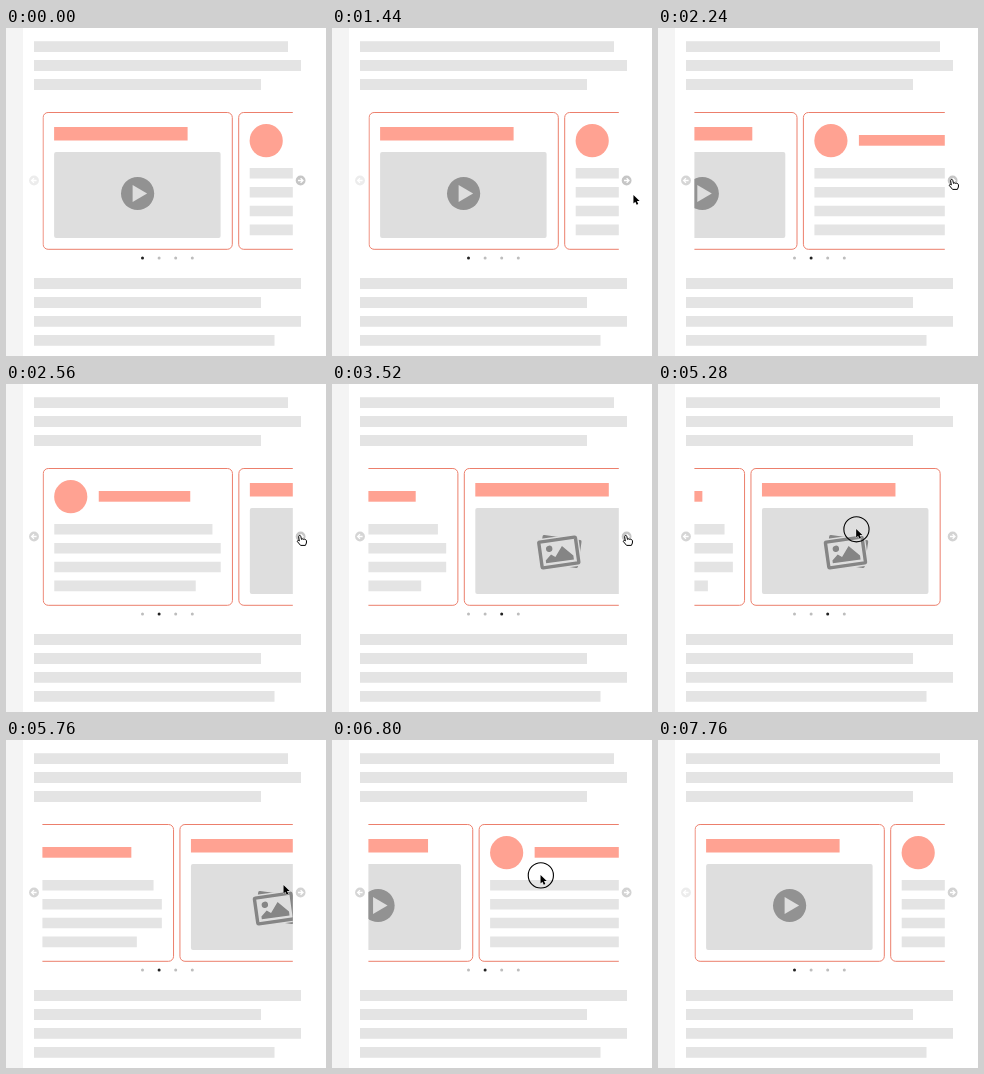
Animation of 320 by 328 pixels, one loop 9120 ms. Source, as an HTML page:

```html
<!DOCTYPE html>
<html lang="en">
<head>
<meta charset="utf-8">
<title>Carousel</title>
<style>
  html, body { margin: 0; width: 100%; height: 100%; overflow: hidden; background: #fff; }
  svg { display: block; width: 100%; height: 100%; }
</style>
</head>
<body>
<svg viewBox="0 0 320 328">
  <defs>
    <clipPath id="view"><rect x="36.4" y="80" width="250.4" height="146"/></clipPath>
    <g id="frame">
      <rect x=".5" y="84.5" width="189.2" height="136.8" rx="5" fill="#fff" stroke="#ec7f6c"/>
    </g>
    <g id="media">
      <use href="#frame"/>
      <rect x="11.5" y="99" width="133.5" height="13.5" fill="#ffa292"/>
      <rect x="11.5" y="124" width="166.5" height="86" rx="2" fill="#dedede"/>
    </g>
    <g id="video">
      <use href="#media"/>
      <circle cx="95" cy="165.5" r="16.6" fill="#929292"/>
      <path d="M90 157V174L104.5 165.5Z" fill="#dedede"/>
    </g>
    <g id="photo">
      <use href="#media"/>
      <g fill="#dedede" stroke="#858585" stroke-width="3.4" stroke-linejoin="round">
        <rect x="-18" y="-12.5" width="36" height="25" transform="translate(96.5 167.5) rotate(8)"/>
        <g transform="translate(95 168.5) rotate(-8)">
          <rect x="-21.5" y="-16" width="43" height="32" rx="2" stroke="none"/>
          <rect x="-18.5" y="-13" width="37" height="26" rx="1"/>
          <g fill="#858585" stroke="none">
            <circle cx="-9" cy="-5" r="3.2"/>
            <path d="M-14 9V6L-8 1L-4 4L4 -6L14 5V9Z"/>
          </g>
        </g>
      </g>
    </g>
    <g id="profile">
      <use href="#frame"/>
      <circle cx="28" cy="112.7" r="16.6" fill="#ffa292"/>
      <rect x="56" y="107" width="91.5" height="10.7" fill="#ffa292"/>
      <path d="M11.5 145.3H169.7M11.5 164.2H178M11.5 183H178M11.5 201.9H153" stroke="#e4e4e4" stroke-width="10.6"/>
    </g>
    <g id="nav">
      <circle r="4.9"/>
      <path d="M-2.6 0H2M0 -2.4L2.4 0L0 2.4" fill="none" stroke="#fff" stroke-width="1.3"/>
    </g>
  </defs>

  <rect width="320" height="328" fill="#fff"/>
  <rect width="17" height="328" fill="#f4f4f4"/>
  <path d="M28 18.7H282M28 37.5H295M28 56.5H255M28 255.5H295M28 274.5H255M28 293.4H295M28 312.4H268.5" stroke="#e4e4e4" stroke-width="10.8"/>

  <g clip-path="url(#view)">
    <g id="track">
      <use href="#video"/>
      <use href="#profile" x="195.6"/>
      <use href="#photo" x="391.2"/>
      <use href="#profile" x="586.8"/>
    </g>
  </g>

  <g id="dots">
    <circle cx="136.5" cy="230" r="1.5"/>
    <circle cx="153.1" cy="230" r="1.5"/>
    <circle cx="169.7" cy="230" r="1.5"/>
    <circle cx="186.3" cy="230" r="1.5"/>
  </g>
  <use id="prev" href="#nav" transform="translate(28 152.5) scale(-1 1)"/>
  <use id="next" href="#nav" transform="translate(294.6 152.5)"/>

  <circle id="ring" r="12.6" fill="none" stroke="#000" stroke-width="1.1"/>
  <path id="arrow" d="M0 0V8.4L1.9 6.7L3.2 9.6L4.8 8.9L3.5 6H6.2Z" fill="#000" stroke="#fff" stroke-width=".7" paint-order="stroke"/>
  <path id="hand" d="M-1.2 .4C-1.2 -1 .8 -1 1 .2L1.7 3.2C2.6 2.4 3.4 2.8 3.6 3.2C4.4 2.6 5 3 5.2 3.6C6 3.2 6.6 3.8 6.7 4.5L6.6 6.8L5.6 9.2H.8L-2.4 5.4C-2.8 4.4 -1.4 3.8 -.5 4.8Z" fill="#fff" stroke="#000" stroke-width="1" stroke-linejoin="round"/>
</svg>

<script>
const LOOP = 9120, STEP = 80, PITCH = 195.6, SETTLE = 460;
const CLICKS = [2080, 3360];
const DRAGS = [
  { press: 4800, release: 5740, from: 142.3, to: 277.5, index: 2 },
  { press: 6540, release: 6858, from: 98.5, to: 219.5, index: 1 }
];
const $ = id => document.getElementById(id);
const dots = [...$('dots').children];

const linear = p => p;
const sine = p => (1 - Math.cos(Math.PI * p)) / 2;
const out = p => 1 - (1 - p) ** 2;

// The CSS "ease" curve, solved by bisection
function ease(x) {
  if (x <= 0) return 0;
  if (x >= 1) return 1;
  const bez = (u, a, b) => 3 * u * (1 - u) ** 2 * a + 3 * u * u * (1 - u) * b + u ** 3;
  let lo = 0, hi = 1;
  for (let i = 0; i < 24; i++) {
    const mid = (lo + hi) / 2;
    if (bez(mid, .25, .25) < x) lo = mid; else hi = mid;
  }
  return bez(lo, .1, 1);
}

// Pointer path: time, x, y, easing towards this point
const PATH = [
  [1280, 310, 186],
  [1760, 294.6, 152, out],
  [4160, 294.6, 152, linear],
  [4240, 272, 160, linear],
  [4320, 212, 170, linear],
  [4400, 145, 171, linear],
  [4480, 121.5, 160, linear],
  [4560, 142.3, 145, linear],
  [4960, 142.3, 145, linear],
  [5680, 277.5, 145, sine],
  [6240, 277.5, 145, linear],
  [6520, 98.5, 136, sine],
  [6560, 98.5, 136, linear],
  [6858, 219.5, 135, sine],
  [7520, 219.5, 135.5, linear],
  [7720, 337, 79, linear]
];

function pointer(t) {
  const i = PATH.findIndex(k => k[0] > t);
  if (i < 1) return null;
  const [t0, x0, y0] = PATH[i - 1], [t1, x1, y1, curve] = PATH[i];
  const p = curve((t - t0) / (t1 - t0));
  return { x: x0 + (x1 - x0) * p, y: y0 + (y1 - y0) * p };
}

// Distance the track has been moved to the left
function scroll(t, at) {
  if (t < DRAGS[0].press)
    return PITCH * (ease((t - 2117) / SETTLE) + ease((t - 3382) / SETTLE));
  const d = t < DRAGS[1].press ? DRAGS[0] : DRAGS[1];
  const start = d.index * PITCH;
  if (t < d.release) return start - (at.x - d.from);
  const pulled = d.to - d.from;
  return start - pulled - (PITCH - pulled) * ease((t - d.release) / SETTLE);
}

function place(el, x, y, shown = true) {
  el.setAttribute('transform', `translate(${x.toFixed(2)} ${y.toFixed(2)})`);
  el.setAttribute('visibility', shown ? 'visible' : 'hidden');
}

function draw(t) {
  const at = pointer(t);
  const index = CLICKS.filter(c => t >= c).length - DRAGS.filter(d => t >= d.release).length;
  place($('track'), 36.6 - scroll(t, at), 0);
  dots.forEach((dot, i) => dot.setAttribute('fill', i === index ? '#222' : '#bdbdbd'));
  $('prev').setAttribute('fill', index ? '#d5d5d5' : '#ececec');
  $('next').setAttribute('fill', t < DRAGS[0].press ? '#c6c6c6' : '#d3d3d3');

  const { x, y } = at || { x: 0, y: 0 };
  const overNext = Math.hypot(x - 294.6, y - 152.5) < 6;
  const clicking = CLICKS.some(c => t >= c && t < c + STEP);
  const dragging = DRAGS.some(d => t >= d.press && t < d.release);
  place($('arrow'), x, y, !!at && !overNext);
  place($('hand'), x - .8, y + .2, !!at && overNext);
  place($('ring'), clicking ? x + 5 : x + .3, clicking ? y + 4 : y + .3, clicking || dragging);
}

const began = performance.now();
function tick() {
  const t = (performance.now() - began) % LOOP;
  draw(Math.floor(t / STEP) * STEP);
  requestAnimationFrame(tick);
}
tick();
</script>
</body>
</html>
```
